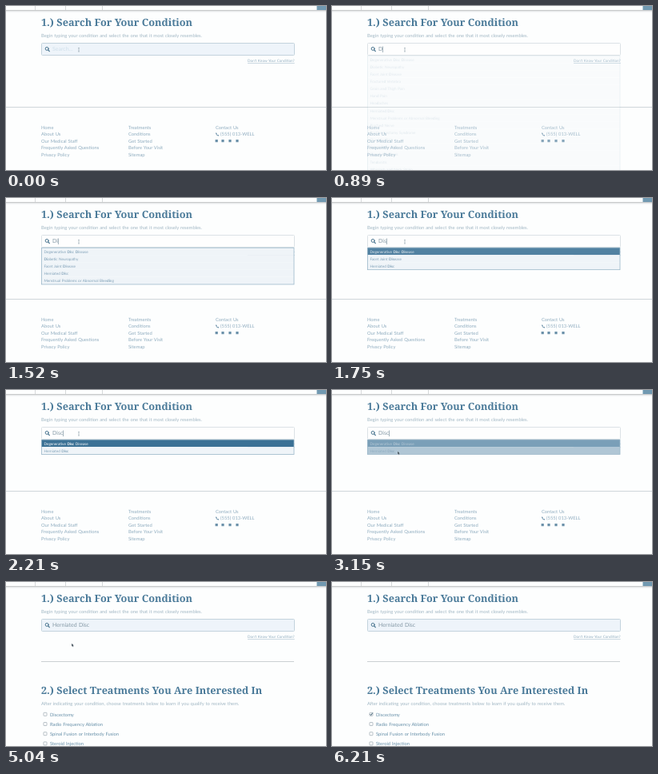
Write an HTML page that moves like this. It is 400 px wide and 205 px high and loops after 7580 ms.

```html
<!DOCTYPE html>
<html lang="en">
<head>
<meta charset="utf-8">
<title>Condition search</title>
<style>
html, body { margin: 0; width: 100%; height: 100%; overflow: hidden; background: #fdfefe; }
svg { display: block; width: 100vw; height: 100vh; }
text { font-family: Lato, "Open Sans", sans-serif; font-size: 5.8px; word-spacing: .07em; text-rendering: geometricPrecision; white-space: pre; }
.title { font: bold 12.7px "Noto Serif", "Liberation Serif", serif; word-spacing: 0; fill: #4a7a99; }
.note { fill: #a0b6c3; }
.foot text { fill: #8facbf; }
.field { font-size: 7px; }
.row { font-size: 4.65px; }
.bold { font-weight: bold; }
.link { font-size: 4.65px; fill: #8facbf; text-decoration: underline; }
.label { fill: #668fa8; }
</style>
</head>
<body>
<svg viewBox="0 0 400 205" preserveAspectRatio="none">
  <rect width="400" height="205" fill="#fdfefe"/>
  <path d="M36.5 0V5M74.5 0V5M120.5 0V5" stroke="#d6d9db"/>
  <rect x="388.5" width="11.5" height="5" fill="#7199b1"/>
  <rect y="5" width="400" height="1.5" fill="#c8cacb"/>
  <rect y="6.5" width="400" height="1" fill="#eceeef"/>

  <text class="title" x="44" y="25">1.) Search For Your Condition</text>
  <text class="note" x="44" y="38.5">Begin typing your condition and select the one that it most closely resembles.</text>
  <text class="link" x="302" y="70.4">Don't Know Your Condition?</text>

  <rect id="box" x="44.5" y="46.5" width="316" height="15" rx="1"/>
  <g fill="none" stroke="#4a7590" stroke-linecap="round">
    <circle cx="51.2" cy="53.4" r="2" stroke-width="1"/>
    <path d="M52.8 55L54.3 56.6" stroke-width="1.2"/>
  </g>
  <text id="entry" class="field" x="58" y="56.3"></text>
  <rect id="caret" y="50.5" width=".7" height="7.5" fill="#7a909d"/>

  <g id="footer" class="foot">
    <path d="M0 126.5H400" stroke="#cfd6da"/>
    <g id="links"></g>
    <path d="M262.7 158.2q-.8 .6 -.4 1.5q.9 2 2.7 2.7q.8 .2 1.3 -.6l-1.2 -.9l-.7 .5q-.8 -.6 -1.1 -1.4l.5 -.6z" fill="#557f9b"/>
    <g id="social" fill="#6a90a9"></g>
  </g>

  <g id="treatments">
    <path d="M44 99.5H360" stroke="#cbd0d3"/>
    <text class="title" x="44" y="140">2.) Select Treatments You Are Interested In</text>
    <text class="note" x="44" y="153.6">After indicating your condition, choose treatments below to learn if you qualify to receive them.</text>
    <g id="options"></g>
    <path id="tick" d="M47.5 165.2L48.7 166.5L50.8 163.6" fill="none" stroke="#33566b" stroke-width="1"/>
  </g>

  <g id="list"></g>
  <path id="beam" d="M-.8 -2.3H.8M0 -2.3V2.3M-.8 2.3H.8" fill="none" stroke="#8597a2" stroke-width=".6"/>
  <path id="arrow" d="M0 0V4L1 3.2L1.7 4.7L2.4 4.4L1.8 2.9H3Z" fill="#3a4a54" stroke="#fff" stroke-width=".2"/>
</svg>
<script>
const LOOP = 7580, TOP = 62, PITCH = 9.15;
const PALE = [239, 244, 248], DARK = [59, 113, 149], WHITE = [255, 255, 255], INK = [127, 160, 183];
const CONDITIONS = [
  "Degenerative Disc Disease", "Diabetic Neuropathy", "Facet Joint Disease",
  "Fractured Vertebra", "Groin and Thigh Pain", "Hand Pain", "Headaches",
  "Herniated Disc", "Menstrual Problems or Abnormal Bleeding", "Pinched Nerve",
  "Postlaminectomy Syndrome", "Shoulder Pain", "Spinal Deformity",
  "Spondylolisthesis", "Tendonitis", "Whiplash and Neck Strain"
];
const COLUMNS = [
  [44, ["Home", "About Us", "Our Medical Staff", "Frequently Asked Questions", "Privacy Policy"]],
  [153, ["Treatments", "Conditions", "Get Started", "Before Your Visit", "Sitemap"]],
  [262, ["Contact Us"]]
];
const OPTIONS = ["Discectomy", "Radio Frequency Ablation", "Spinal Fusion or Interbody Fusion", "Steroid Injection"];
const TYPING = [[890, "D"], [1190, "Di"], [1640, "Dis"], [2100, "Disc"]];
// time, x, y of the pointer
const PATH = [[0, 91, 54.7], [2680, 91, 54.7], [3000, 82, 76.5], [5040, 82, 76.5],
  [5350, 80, 122], [5690, 90, 166], [6040, 90, 166], [6210, 104, 207]];

const $ = id => document.getElementById(id);
const clamp = v => Math.max(0, Math.min(1, v));
const ramp = (t, a, b) => clamp((t - a) / (b - a));
const easeOut = p => 1 - (1 - p) ** 2;
const mix = (a, b, p) => `rgb(${a.map((v, i) => Math.round(v + (b[i] - v) * p))})`;
const show = (id, on) => $(id).setAttribute("visibility", on ? "visible" : "hidden");

$("links").innerHTML = COLUMNS.map(([x, names]) =>
  names.map((name, i) => `<text x="${x}" y="${153.6 + i * 8.6}">${name}</text>`).join("")
).join("") + '<text x="268" y="162.2">(555) 013-WELL</text>';
$("social").innerHTML = [263.2, 271, 280, 289].map(x =>
  `<rect x="${x - 1.6}" y="167" width="3.2" height="3.2"/>`).join("");
$("options").innerHTML = OPTIONS.map((name, i) => {
  const y = 165.3 + i * 12.2;
  return `<rect x="47" y="${y - 2}" width="4" height="4" rx=".5" fill="#fff" stroke="#9ba8b0" stroke-width=".7"/>
    <text class="label" x="55" y="${y + 2.2}">${name}</text>`;
}).join("");

function pointer(t) {
  const i = PATH.findIndex(k => k[0] > t);
  if (i < 0) return PATH[PATH.length - 1].slice(1);
  const a = PATH[i - 1], b = PATH[i];
  const p = ramp(t, a[0], b[0]);
  return [a[1] + (b[1] - a[1]) * p, a[2] + (b[2] - a[2]) * p];
}

function drawList(t, query) {
  if (!query || t >= 3840) { $("list").innerHTML = ""; return; }
  const items = CONDITIONS.filter(c => c.toLowerCase().includes(query.toLowerCase()));
  const enter = easeOut(ramp(t, 1660, 1800)), move = ramp(t, 3000, 3430);
  const glow = [enter * (1 - move), move];
  const match = new RegExp(query, "gi");
  const rows = items.map((item, i) => {
    const y = TOP + i * PITCH, p = glow[i] || 0;
    const text = item.replace(match, m => `<tspan class="bold">${m}</tspan>`);
    return `<rect x="44" y="${y}" width="316" height="${PITCH}" fill="${mix(PALE, DARK, p)}"/>
      <text class="row" x="47.5" y="${y + 6.5}" fill="${mix(INK, WHITE, p * p)}">${text}</text>`;
  });
  $("list").innerHTML = rows.join("") +
    `<rect x="44.5" y="${TOP + .2}" width="315.5" height="${items.length * PITCH}" fill="none" stroke="#9cb8ca" stroke-width=".8"/>`;
  $("list").setAttribute("opacity", ramp(t, 860, 1000) * (1 - ramp(t, 3640, 3840)));
}

function drawField(t, query) {
  const chosen = t >= 3670;
  const active = t >= 410 && !chosen;
  $("box").setAttribute("fill", active ? "#fefefe" : "#eef4fa");
  $("box").setAttribute("stroke", active ? "#dce2e6" : "#c3d3dd");
  const entry = $("entry");
  entry.textContent = chosen ? "Herniated Disc" : query || "Search...";
  entry.setAttribute("fill", chosen || query ? "#8599a6" : "#cfe0eb");
  const blink = (t >= 230 && t < 710) || (t >= 890 && t < 2440) || (t >= 2930 && t < 3430);
  show("caret", blink);
  $("caret").setAttribute("x", 58 + (query ? entry.getComputedTextLength() : 0));
}

function draw(t) {
  const query = TYPING.reduce((s, [at, word]) => t >= at ? word : s, "");
  drawField(t, query);
  drawList(t, query);

  show("footer", t < 4740);
  show("treatments", t >= 4740);
  show("tick", t >= 6040);

  const [x, y] = pointer(t), over = y < 61;
  show("beam", over);
  show("arrow", !over && t < 6210);
  for (const id of ["beam", "arrow"]) $(id).setAttribute("transform", `translate(${x} ${y})`);
}

const start = performance.now();
function tick(now) {
  draw(Math.max(0, now - start) % LOOP);
  requestAnimationFrame(tick);
}
draw(0);
requestAnimationFrame(tick);
</script>
</body>
</html>
```
